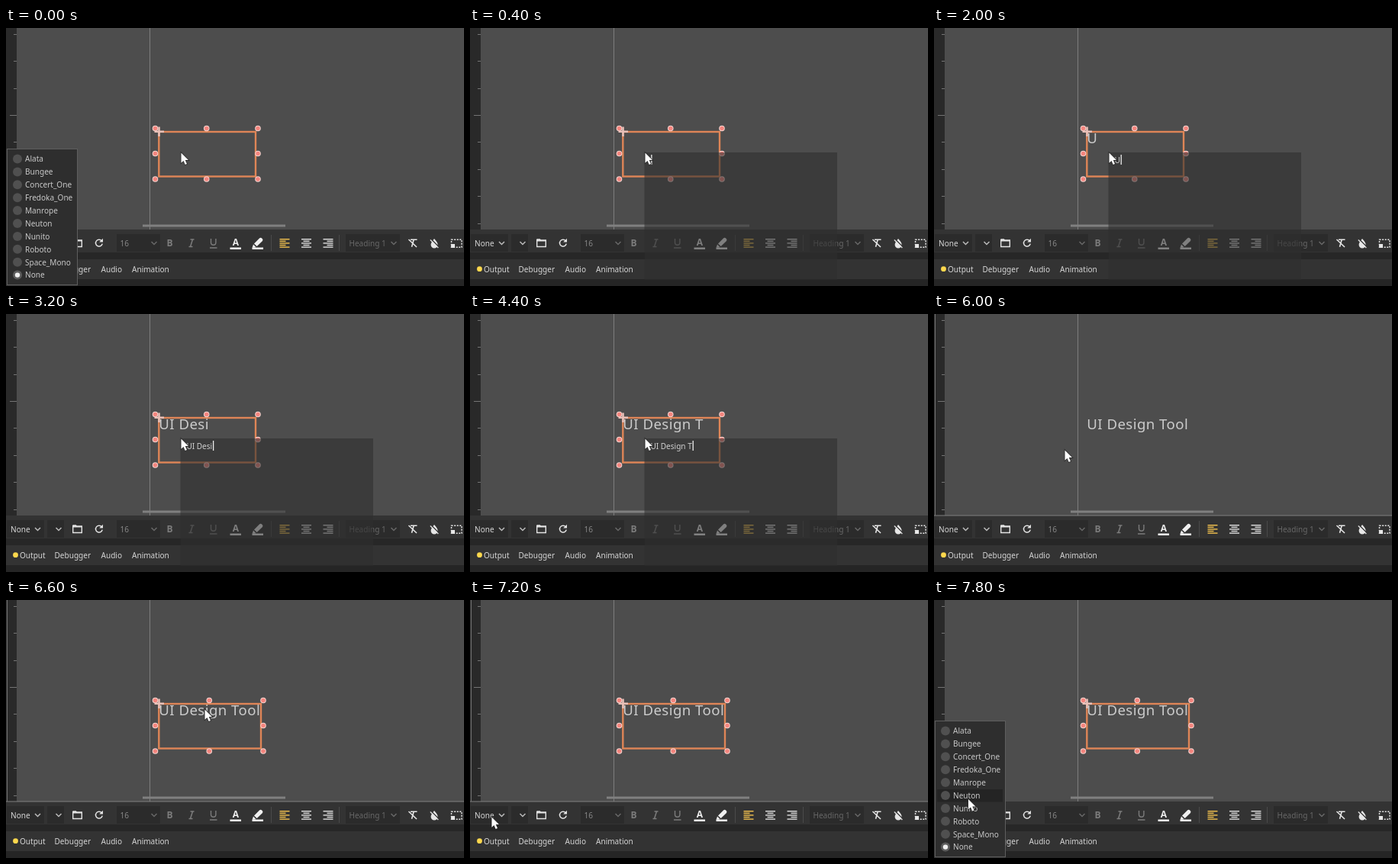
Animation of 600 by 338 pixels, one loop 8 s. Source, as an HTML page with a canvas:

```html
<!DOCTYPE html>
<html lang="en">
<head>
<meta charset="utf-8">
<title>UI Design Tool</title>
<style>
html, body { margin: 0; width: 100%; height: 100%; overflow: hidden; background: #4d4d4d; }
canvas { display: block; }
</style>
</head>
<body>
<canvas id="stage" width="600" height="338"></canvas>
<script>
const ctx = document.getElementById('stage').getContext('2d');
const LOOP = 8000, STEP = 200;
const UI_FONT = '10.05px "Noto Sans", sans-serif';
const LABEL_FONT = '18.6px "Noto Sans", sans-serif';
const LABEL = 'UI Design Tool';
const FONTS = ['Alata', 'Bungee', 'Concert_One', 'Fredoka_One', 'Manrope',
  'Neuton', 'Nunito', 'Roboto', 'Space_Mono', 'None'];
const LIGHT = '#d6d6d6', DIM = '#7c7c7c', FAINT = '#686868', YELLOW = '#f2c14e';

// [time, typed characters]
const TYPING = [[0, 0], [2000, 1], [2200, 2], [2600, 3], [2800, 4], [3000, 5], [3200, 7],
  [3400, 8], [3600, 9], [4000, 10], [4400, 11], [4600, 12], [4800, 13], [5000, 14]];
// [time, x, y] of the pointer tip
const POINTER = [[0, 229, 163], [5400, 229, 163], [5600, 192, 176], [5800, 171, 178],
  [6200, 171, 178], [6400, 215, 161], [6600, 260, 143], [6800, 226, 172],
  [7000, 110, 236], [7200, 28, 284], [7400, 26, 290], [7800, 44.5, 260.5], [8000, 44.5, 260.5]];

const between = (t, a, b) => t >= a && t < b;

function typedAt(t) {
  return TYPING.filter(k => k[0] <= t).pop()[1];
}

function pointerAt(t) {
  const i = POINTER.findIndex(k => k[0] > t);
  const [t0, x0, y0] = POINTER[i - 1], [t1, x1, y1] = POINTER[i];
  const p = (t - t0) / (t1 - t0);
  return [x0 + (x1 - x0) * p, y0 + (y1 - y0) * p];
}

function box(x, y, w, h, color) {
  ctx.fillStyle = color;
  ctx.fillRect(x, y, w, h);
}

function text(str, x, baseline, color, font = UI_FONT, spacing = 0) {
  ctx.font = font;
  ctx.letterSpacing = spacing + 'px';
  ctx.fillStyle = color;
  ctx.fillText(str, x, baseline);
}

function disc(x, y, r, color) {
  ctx.fillStyle = color;
  ctx.beginPath();
  ctx.arc(x, y, r, 0, 7);
  ctx.fill();
}

function stroke(path, color, width = 1.4) {
  ctx.strokeStyle = color;
  ctx.lineWidth = width;
  ctx.stroke(new Path2D(path));
}

function fill(path, color) {
  ctx.fillStyle = color;
  ctx.fill(new Path2D(path));
}

const chevron = (x, color) => stroke(`M${x - 3.5} 280l3.5 3.5 3.5-3.5`, color, 1.5);

function alignIcon(x, color, anchor) {
  for (let i = 0; i < 5; i++) {
    const w = i % 2 ? 8 : 13;
    box(x + (13 - w) * anchor, 276 + i * 2.6, w, 1.4, color);
  }
}

function drawCanvasArea() {
  box(0, 0, 600, 264, '#4d4d4d');
  box(0, 0, 14, 264, '#292929');
  for (let k = -3; k <= 4; k++) {
    const len = k ? 4 : 9;
    box(14 - len, Math.round(114 + k * 35.4), len, 1, '#747474');
  }
  box(188, 0, 1, 264, '#7d7d7d');
  box(179, 257.5, 187, 3, '#808080');
}

function drawToolbar() {
  box(0, 264, 600, 31, '#333');
  box(0, 294, 600, 9, '#272727');
  box(0, 303, 600, 26, '#333');
  box(0, 329, 600, 9, '#252525');
  for (const [x, w] of [[1, 49], [54, 22], [145, 57], [445, 71]]) box(x, 270, w, 23, '#2b2b2b');
  for (const x of [347, 436]) box(x, 271, 1, 21, '#4a4a4a');

  text('None', 6, 285.5, LIGHT);
  chevron(41.5, '#bbb');
  chevron(69, '#bbb');
  stroke('M87.7 286.5v-8.5h11.6v8.5z', '#e4e4e4', 1.4);
  fill('M87 277.5q0-1.2 1.2-1.2h3.6l1.4 1.6h5.6v1.6H87z', '#e4e4e4');
  text('16', 149.5, 285.5, '#878787');
  chevron(194, FAINT);
  stroke('M125.4 279a4.4 4.4 0 1 0 .8 3.6', '#e4e4e4', 1.5);
  fill('M127 275.8v4.8h-4.8z', '#e4e4e4');

  text('B', 210.5, 286, DIM, 'bold 12px "Noto Sans", sans-serif');
  stroke('M241.5 277h5M239.5 286.5h5M244.5 277l-3 9.5', DIM, 1.5);
  stroke('M268.5 276v5a3.2 3.2 0 0 0 6.4 0v-5M267 288h9.5', DIM, 1.4);
  text('A', 296.8, 285, '#eee', 'bold 12px "Noto Sans", sans-serif');
  box(293.5, 287.5, 14.5, 2.5, '#f4f4f4');
  fill('M325 282.5l7.2-7.3q1.6-1 3.3.5t.5 3.2l-7.3 7.2zM324 283.6l3.4 3.4-1.4.8h-3.4z', '#f0f0f0');
  box(322.5, 287.5, 14.5, 2.5, '#f4f4f4');

  alignIcon(358.5, YELLOW, 0);
  alignIcon(387, '#dedede', 0.5);
  alignIcon(415.5, '#dedede', 1);
  text('Heading 1', 449.5, 285.5, FAINT);
  chevron(508, FAINT);

  stroke('M530 277.3h8.5M534.2 277.3l-2.7 9.5M527.5 277l10.5 10', '#e6e6e6', 1.6);
  fill('M561 276q5 5.5 4.5 8a4.4 4.4 0 0 1-8.9 0q-.2-2.5 4.4-8z', '#e6e6e6');
  stroke('M556.8 276.5l10 10', '#333', 1.3);
  stroke('M555.8 277.5l10.5 10.5', '#e6e6e6', 1.2);
  ctx.setLineDash([2, 1.6]);
  stroke('M583.5 277.3h13.5v10h-13.5z', '#e6e6e6', 1.5);
  ctx.setLineDash([]);
  box(583, 283, 5, 5, '#e6e6e6');

  disc(12.5, 315.7, 3.4, '#ffd84d');
  text('Output', 18, 319.5, LIGHT);
  text('Debugger', 63.5, 319.5, LIGHT);
  text('Audio', 124.5, 319.5, LIGHT);
  text('Animation', 165, 319.5, LIGHT);
}

function drawSelection(right) {
  ctx.strokeStyle = '#df8557';
  ctx.lineWidth = 2.4;
  ctx.strokeRect(200.3, 136, right - 200.3, 58.5);
  const mid = (195.5 + right + 3) / 2;
  for (const x of [195.5, mid, right + 3]) {
    for (const y of [131.5, 164.5, 198]) {
      if (x === mid && y === 164.5) continue;
      disc(x, y, 3.8, '#f6d6d1');
      disc(x, y, 2.8, '#f4857e');
    }
  }
  stroke('M200.5 129.5v12.5M194.5 135.7h12.5', '#e8c0b8', 2.6);
}

function drawEditor(str, caretOn) {
  box(228.5, 163, 252.5, 167, 'rgba(47, 47, 47, .58)');
  text(str, 236.4, 176.5, '#d0d0d0');
  if (caretOn) box(237.2 + ctx.measureText(str).width, 166, 1.3, 13, '#eee');
}

function drawMenu(hovered) {
  box(0, 158, 94, 180, '#2e2e2e');
  ctx.strokeStyle = '#5e5e5e';
  ctx.lineWidth = 1;
  ctx.strokeRect(1.5, 158.5, 92, 178);
  FONTS.forEach((name, i) => {
    const y = 171.5 + i * 16.9;
    if (i === hovered) box(4, y - 8, 86, 16.5, '#242424');
    const chosen = name === 'None';
    disc(15, y, 6, chosen ? '#5c5c5c' : '#505050');
    if (chosen) disc(15, y, 3.2, '#f0f0f0');
    text(name, 25, y + 3.8, '#c9c9c9');
  });
}

function drawPointer([x, y]) {
  ctx.save();
  ctx.translate(x + 0.5, y + 0.5);
  const arrow = 'M0 0v13.2l3-2.8 2.2 5 2.3-1-2.2-4.8h4.2z';
  stroke(arrow, '#2a2a2a', 1.6);
  fill(arrow, '#fff');
  ctx.restore();
}

function draw(t) {
  const typed = LABEL.slice(0, typedAt(t));
  const pointer = pointerAt(t);
  const menuOpen = t < 200 || t >= 7400;
  const focused = between(t, 5800, 7400);

  drawCanvasArea();
  drawToolbar();
  if (focused) {
    box(0, 263.5, 600, 1, '#808080');
    box(1, 0, 1, 264, '#747474');
  }
  text(typed, 200.3, 151, '#cbcbcb', LABEL_FONT, 0.45);
  if (!between(t, 6000, 6600)) drawSelection(t < 5000 ? 327 : 334);
  if (between(t, 400, 5800)) drawEditor(typed, !between(t, 1000, 1600));
  if (menuOpen) drawMenu(t < 200 ? -1 : Math.floor((pointer[1] - 163) / 16.9));
  drawPointer(pointer);
}

function tick(now) {
  const t = now % LOOP;
  draw(t - t % STEP);
  requestAnimationFrame(tick);
}
requestAnimationFrame(tick);
</script>
</body>
</html>
```
